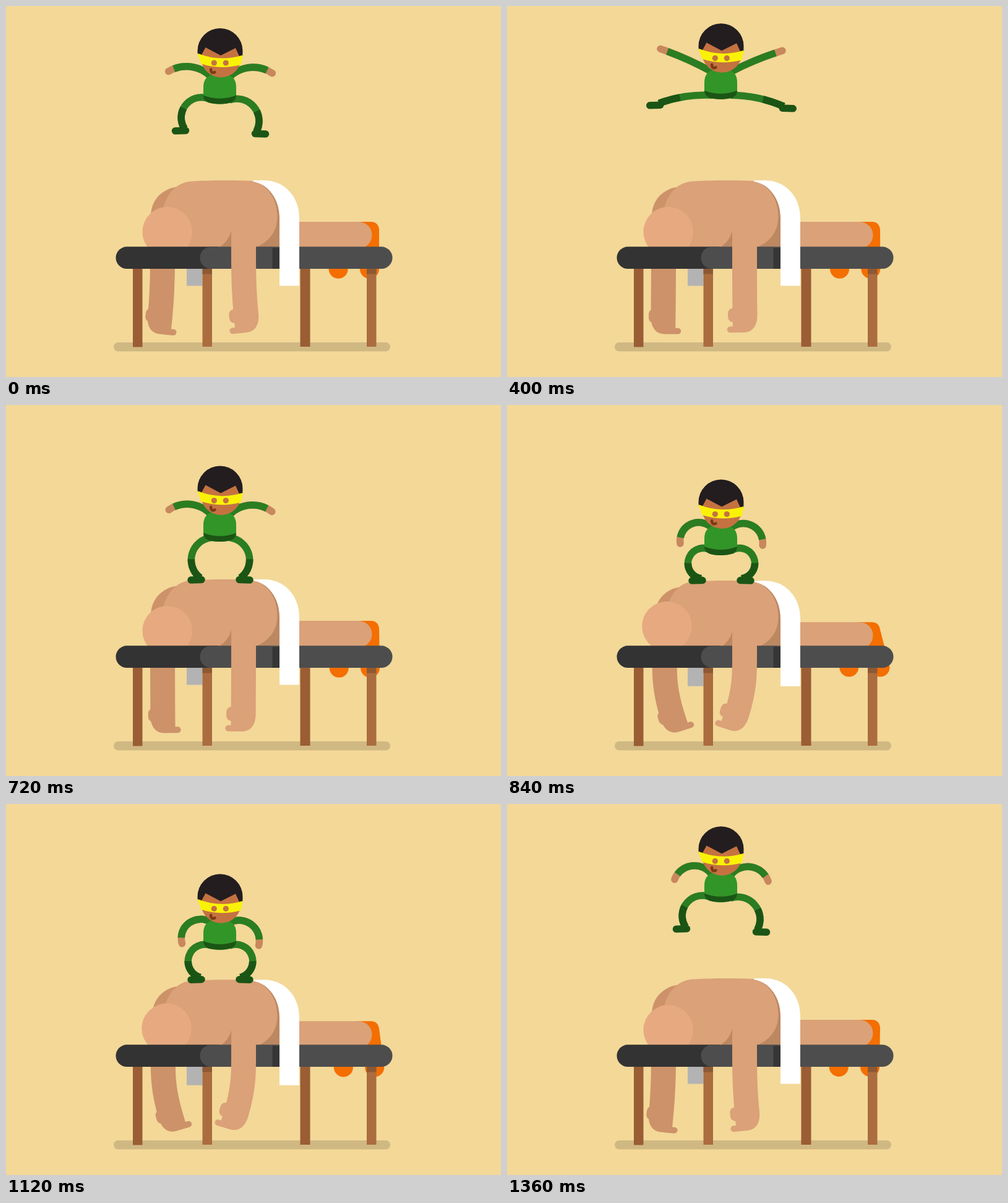
Write an HTML page that moves like this. It is 800x600 px and loops after 1400 ms.

```html
<!DOCTYPE html>
<html lang="en">
<head>
<meta charset="utf-8">
<title>Massage table</title>
<style>
  html, body { margin: 0; width: 100%; height: 100%; overflow: hidden; background: #f3d898; }
  svg { display: block; width: 100vw; height: 100vh; }
  .line { fill: none; stroke-width: 11.5; }
  .round { stroke-linecap: round; }
  .green { stroke: #2b7d22; }
  .boot { stroke: #1b5515; }
  .hand { stroke: #c8875c; }
  .far { fill: #cd9269; }
  .skin { fill: #dba178; }
</style>
</head>
<body>
<svg viewBox="0 0 800 600">
  <defs>
    <path id="palm" d="M20 -1V0C20 17 12 28 -2 28H-24A5 5 0 0 1 -24 18H-20V-1Z"/>
  </defs>
  <rect width="800" height="600" fill="#f3d898"/>
  <rect x="174" y="544" width="447" height="14.5" rx="7.2" fill="#d0b883"/>

  <path id="farArm" fill="none" stroke="#cd9269" stroke-width="40"/>
  <g id="farHand" class="far">
    <use href="#palm"/>
    <rect x="8" y="-12" width="15.5" height="22" rx="8"/>
  </g>

  <g class="sink">
    <rect x="292" y="400" width="25.5" height="52.5" fill="#b3b3b3"/>
    <circle id="toe" r="15.5" fill="#f46e00"/>
    <path id="shoe" fill="#f46e00"/>
  </g>

  <g fill="#9a5d34">
    <rect x="205" y="420" width="15.5" height="131.5"/>
    <rect x="475.5" y="420" width="16" height="131"/>
  </g>
  <g fill="#ab6c3f">
    <rect x="317.5" y="420" width="15.5" height="131"/>
    <rect x="583" y="420" width="15.5" height="131"/>
  </g>
  <g fill="#8d5934">
    <rect x="317.5" y="420" width="15.5" height="13.5"/>
    <rect x="583" y="420" width="15.5" height="13.5"/>
  </g>

  <g class="sink">
    <path class="skin" d="M440 349H570A20 20 0 0 1 570 392H440Z"/>
    <path id="shoulder" class="far"/>
    <path fill="#bb8862" d="M385 283H400C427 289 443 315 443 345V392H340V320Z"/>
    <path id="back" class="skin"/>
  </g>
  <circle id="head" r="40.3" fill="#e7aa80"/>

  <rect x="177.5" y="389.3" width="180" height="35.7" rx="17.8" fill="#333"/>
  <rect x="313.5" y="389.3" width="311" height="35.7" rx="17.8" fill="#4d4d4d"/>
  <rect x="430.5" y="391" width="12" height="34" fill="#363636"/>

  <path id="nearArm" fill="none" stroke="#dba178" stroke-width="40"/>
  <g id="nearHand" class="skin">
    <use href="#palm"/>
    <rect x="-27.5" y="-11.5" width="16" height="22.5" rx="8"/>
  </g>
  <path class="sink" fill="#fff" d="M398 282H417C450 282 474 308 474 343V452.5H442V343C442 313 425 289 400 284Z"/>

  <g id="limbs"></g>
  <g id="hero">
    <path fill="#329528" d="M319 132C319 115 328 110.5 345.5 110.5S372 115 372 132V143C372 155 362 158.5 345.5 158.5S319 155 319 143Z"/>
    <path fill="#1b5515" d="M319 144.5Q345.5 154.5 372 144.5C372 155 362 158.5 345.5 158.5S319 155 319 144.5Z"/>
    <circle cx="347.5" cy="83" r="32.5" fill="#c57241"/>
    <path fill="#231d1f" d="M309.7 78L309.5 72.5A36.5 36.5 0 0 1 382.5 72.5L382.3 81H377L371 68L347 80L322.5 67L316 79Z"/>
    <path fill="#f9f207" d="M309.5 76.5Q346 91 382.5 79.5L379.5 95Q346 103.5 315.5 93.5Z"/>
    <g fill="#c57241"><circle cx="336.3" cy="92" r="4.6"/><circle cx="355.3" cy="92" r="4.6"/></g>
    <path fill="none" stroke="#7b3a17" stroke-width="4.5" class="round" d="M331 102.5Q331.5 110 337.5 107"/>
  </g>
</svg>
<script>
const LOOP = 1400, STEP = 40, AXIS = 346.5;

const $ = id => document.getElementById(id);
const set = (el, name, value) => el.setAttribute(name, value);
const mix = (a, b, u) => a + (b - a) * u;
const sinkers = document.querySelectorAll(".sink");

function ramp(t, from, to) {
  const u = Math.min(1, Math.max(0, (t - from) / (to - from)));
  return u * u * (3 - 2 * u);
}

// Rises from 0 to 1 over a..b and falls back over c..d; may run past the loop end.
function pulse(t, a, b, c, d) {
  const u = t < a ? t + LOOP : t;
  return ramp(u, a, b) - ramp(u, c, d);
}

// Fading swing that starts as the hero takes off.
function wobble(t) {
  const s = (t - 1280 + LOOP) % LOOP;
  return -8.5 * Math.sin(2 * Math.PI * s / 480) * Math.exp(-s / 300);
}

function pose(t) {
  const hit = pulse(t, 710, 900, 980, 1220);
  const hop = t < 560 ? 9.8 * Math.sin(Math.PI * t / 560) : 0;
  return {
    hit,
    y: 84.5 * pulse(t, 560, 800, 1065, 1370) - hop,
    sink: 2.5 * pulse(t, 700, 880, 1060, 1400),
    swing: 24 * pulse(t, 720, 900, 1000, 1320) + wobble(t),
    feet: 538 + 19.5 * hit + 0.4 * wobble((t + 80) % LOOP),
    raise: pulse(t, 1250, 1515, 1960, 2320),
    split: pulse(t, 0, 240, 300, 920),
    plant: pulse(t, 560, 710, 1240, 1350)
  };
}

function addLine(cls, dash) {
  const p = document.createElementNS("http://www.w3.org/2000/svg", "path");
  set(p, "class", "line " + cls);
  if (dash) {
    set(p, "pathLength", 100);
    set(p, "stroke-dasharray", dash);
  }
  $("limbs").append(p);
  return p;
}

const sides = [-1, 1].map(side => ({
  side,
  leg: addLine("green"),
  boot: addLine("boot", "0 60 40 10"),
  foot: addLine("boot round"),
  hand: addLine("hand round"),
  sleeve: addLine("green", "87 20")
}));

// Rubber limb: an arc that bows outward more as its ends come together.
function limb(x1, y1, x2, y2, length, minBow, side) {
  const c = Math.hypot(x2 - x1, y2 - y1);
  const bow = Math.max(minBow, 0.433 * Math.sqrt(Math.max(0, length * length - c * c)));
  const r = (c * c / 4 + bow * bow) / (2 * bow);
  return `M${x1} ${y1}A${r} ${r} 0 ${bow > c / 2 ? 1 : 0} ${side > 0 ? 1 : 0} ${x2} ${y2}`;
}

function drawLimbs(part, k) {
  const { side } = part;
  const at = offset => AXIS + side * offset;

  const handY = mix(148.5, 77, k.raise) + (side > 0 ? 3 : 0);
  const arm = limb(at(15.5), 114 + k.y, at(mix(62, 98.5, k.raise)), handY + k.y, 74, 2, side);
  set(part.hand, "d", arm);
  set(part.sleeve, "d", arm);

  const reach = mix(58 + 46 * k.split, 32.5, k.plant);
  const airY = k.y + 198.5 - 36 * k.split + (side > 0 ? 5 : 0);
  const footY = mix(airY, 279.5 + k.sink / 2, k.plant);
  const leg = limb(at(14.5), 152 + k.y, at(reach), footY, 86, 4.5, side);
  set(part.leg, "d", leg);
  set(part.boot, "d", leg);
  set(part.foot, "d", `M${at(reach - 2)} ${footY + 3}L${at(reach + 15)} ${footY + 3.5}`);
}

// side is 1 for the near arm, -1 for its mirrored twin.
function drawHanging(arm, hand, x, y, side, angle) {
  const rad = angle * Math.PI / 180;
  const wx = x - side * 0.72 * angle;
  const bx = wx + side * 42 * Math.sin(rad), by = y - 42 * Math.cos(rad);
  set(arm, "d", `M${x} 355V412C${x} 436 ${bx} ${by} ${wx} ${y}`);
  set(hand, "transform", `translate(${wx} ${y}) scale(${side} 1) rotate(${angle})`);
}

function drawMan(k) {
  sinkers.forEach(el => set(el, "transform", `translate(0 ${k.sink})`));
  drawHanging($("nearArm"), $("nearHand"), 384, 500, 1, k.swing);
  drawHanging($("farArm"), $("farHand"), 253 + 2 * k.hit, 502.5, -1, k.swing);

  const s = 6 * k.hit;
  set($("head"), "cx", 260.7 - 3 * k.hit);
  set($("head"), "cy", 365.3 + k.sink - 12.5 * k.hit);
  set($("shoulder"), "d", `M${234 + s} 389V340C${234 + s} 312 ${255 + s} 292 285 292H300V389Z`);
  set($("back"), "d", `M${253 + s} 332C${258 + s} 305 ${275 + s / 2} 285 300 283.5`
    + "C330 281.5 370 281.5 400 283C425 291 438.5 314 438.5 340C438.5 366 424 382 404 390"
    + `H364V364Q360 380 345 390H${253 + s}Z`);

  const x = k.feet + 50.3, y = 425.3 - 4.5 * k.hit;
  set($("toe"), "cx", k.feet);
  set($("toe"), "cy", y);
  set($("shoe"), "d", `M566 349H590Q601 349 603 361L${x + 15.5} ${y}A15.5 15.5 0 0 1 ${x - 15.5} ${y}L572 362Z`);
}

function draw(t) {
  const k = pose(t);
  set($("hero"), "transform", `translate(0 ${k.y})`);
  sides.forEach(part => drawLimbs(part, k));
  drawMan(k);
}

const start = performance.now();
function tick() {
  const t = (performance.now() - start) % LOOP;
  draw(Math.floor(t / STEP) * STEP);
  requestAnimationFrame(tick);
}
tick();
</script>
</body>
</html>
```
